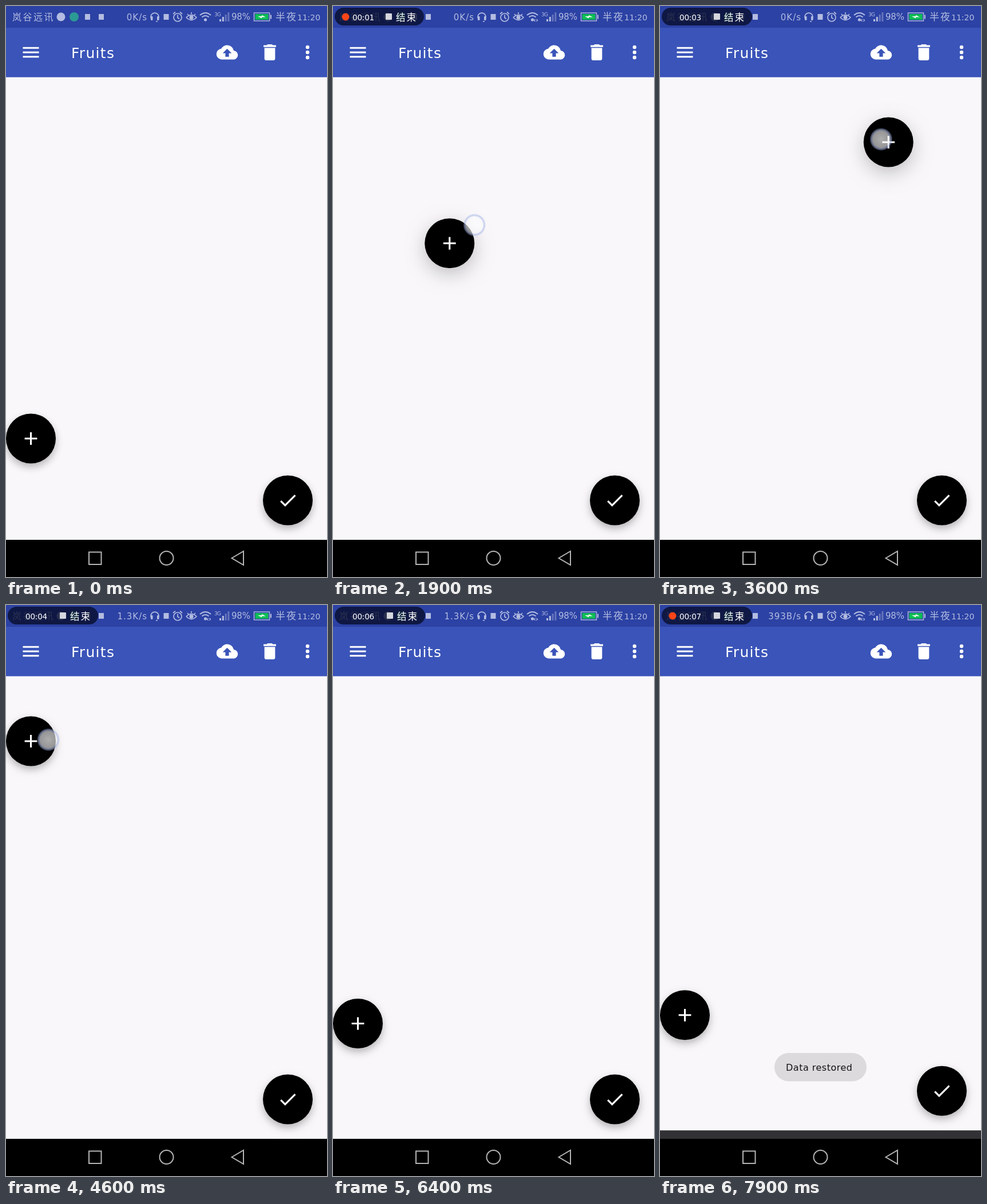
Animation of 561x998 px, one loop 8000 ms. Source, as an HTML page with a canvas:

```html
<!DOCTYPE html>
<html lang="en">
<head>
<meta charset="utf-8">
<title>Floating button</title>
<style>
html, body { margin: 0; width: 561px; height: 998px; overflow: hidden; background: #f9f7fa; }
canvas { display: block; }
</style>
</head>
<body>
<canvas id="stage" width="561" height="998"></canvas>
<script>
const c = document.getElementById('stage').getContext('2d');
const LOOP = 8000, DP = 1.558, PALE = '#b3bce1';
const LATIN = '"DejaVu Sans", sans-serif', HAN = '"Noto Sans CJK SC", "Noto Sans CJK", sans-serif';

const icons = {
  menu: 'M3 18h18v-2H3v2zm0-5h18v-2H3v2zm0-7v2h18V6H3z',
  cloud: 'M19.35 10.04C18.67 6.59 15.64 4 12 4 9.11 4 6.6 5.64 5.35 8.04 2.34 8.36 0 10.91 0 14c0 3.31 2.69 6 6 6h13c2.76 0 5-2.24 5-5 0-2.64-2.05-4.78-4.65-4.96zM14 13v4h-4v-4H7l5-5 5 5h-3z',
  bin: 'M6 19c0 1.1.9 2 2 2h8c1.1 0 2-.9 2-2V7H6v12zM19 4h-3.5l-1-1h-5l-1 1H5v2h14V4z',
  add: 'M19 13h-6v6h-2v-6H5v-2h6V5h2v6h6v2z',
  check: 'M9 16.17L4.83 12l-1.42 1.41L9 19 21 7l-1.41-1.41z'
};
for (const k in icons) icons[k] = new Path2D(icons[k]);

// time, x, y of the draggable button
const route = [
  [0, 43.5, 756], [300, 43.5, 756], [500, 60, 560], [700, 92, 330], [800, 96, 301],
  [1000, 120, 300], [1300, 150, 370], [1600, 170, 435], [1800, 185, 438],
  [1900, 203.5, 415], [2150, 265, 360], [2400, 340, 335], [2700, 414.5, 344.5],
  [2850, 440, 335], [3050, 517, 325], [3250, 517, 325], [3450, 475, 270],
  [3600, 400, 238], [3900, 180, 236], [4100, 90, 238], [4300, 43.5, 238],
  [4650, 43.5, 238], [5000, 110, 300], [5400, 160, 432], [5800, 130, 640],
  [6050, 80, 731.5], [6250, 43.5, 731.5]
];
// finger position relative to the button, one list per drag
const drags = [
  [[300, 0, -5], [800, -7, -14], [1900, 43.5, -32], [2700, 47.5, -27.5], [2850, 47, -27]],
  [[3250, -5, -5], [4150, -25, -5]],
  [[4550, 31, -3], [6050, 20, 8]]
];
// start, end, x, y
const taps = [[6550, 6720, 461, 81], [7400, 7550, 482, 895]];

const clamp = v => Math.max(0, Math.min(1, v));
const ease = (t, from, span) => { const u = clamp((t - from) / span); return u * u * (3 - 2 * u); };

function along(keys, t) {
  let i = 0;
  while (i < keys.length - 2 && t > keys[i + 1][0]) i++;
  const a = keys[i], b = keys[i + 1], u = clamp((t - a[0]) / (b[0] - a[0]));
  return [a[1] + (b[1] - a[1]) * u, a[2] + (b[2] - a[2]) * u];
}

function rect(x, y, w, h, fill, r = 0) {
  c.fillStyle = fill;
  c.beginPath();
  c.roundRect(x, y, w, h, r);
  c.fill();
}

function disc(x, y, r, fill) {
  c.fillStyle = fill;
  c.beginPath();
  c.arc(x, y, r, 0, 7);
  c.fill();
}

function line(d, color = PALE, width = 1.7) {
  c.strokeStyle = color;
  c.lineWidth = width;
  c.stroke(new Path2D(d));
}

function text(s, x, y, size, color, gap = 0, family = LATIN, align = 'left') {
  c.font = size + 'px ' + family;
  c.letterSpacing = gap + 'px';
  c.textAlign = align;
  c.fillStyle = color;
  c.fillText(s, x, y);
}

function icon(name, x, y) {
  c.save();
  c.translate(x, y);
  c.scale(DP, DP);
  c.translate(-12, -12);
  c.fillStyle = '#fff';
  c.fill(icons[name]);
  c.restore();
}

function fab(name, x, y, lifted) {
  c.save();
  c.shadowColor = lifted ? 'rgba(0,0,0,.23)' : 'rgba(0,0,0,.28)';
  c.shadowBlur = lifted ? 32 : 14;
  c.shadowOffsetY = lifted ? 10 : 6;
  disc(x, y, 43.5, '#000');
  c.restore();
  icon(name, x, y);
}

function statusBar(t) {
  rect(0, 0, 561, 38, '#2c42a4');
  text('岚谷远讯', 11, 25, 16, PALE, 2.5, HAN);
  disc(96, 19, 7.5, PALE);
  disc(119, 19, 8, '#2c9a94');
  rect(138, 14, 9, 10, PALE);
  rect(162, 14, 9, 10, PALE);

  const speed = t < 4000 ? '0K/s' : t < 7000 ? '1.3K/s' : '393B/s';
  text(speed, 247, 25, 15, PALE, 1, LATIN, 'right');
  // headset
  line('M255 24A7 7 0 1 1 265 24M262 27h3');
  rect(253, 18, 3.5, 7, PALE, 1);
  rect(264, 18, 3.5, 7, PALE, 1);
  rect(275.5, 14, 9, 10, PALE);
  // alarm
  line('M293 20a7 7 0 1 0 14 0a7 7 0 1 0 -14 0M300 15.500v5l3 2M292 14l4-3.500M308 14l-4-3.500');
  // eye
  line('M315 20q9-9 18 0q-9 9-18 0M317 14l2 2M324 11v3M331 14l-2 2');
  disc(324, 20, 3.5, PALE);
  // wifi
  line('M339 16q9.500-8 19 0M342.500 19.500q6-5 12 0', PALE, 2);
  disc(348.5, 24, 2.6, PALE);
  if (t > 1500) line('M353.500 23l-2 2 2 2M355.500 23l2 2-2 2', PALE, 1.2);
  text('3G', 364, 18, 9, PALE, -.8);
  for (let i = 0; i < 4; i++) {
    const h = 4 + i * 4;
    rect(373 + i * 4.8, 27 - h, 3, h, i < 2 ? PALE : '#6675bd');
  }
  text('98%', 394, 24, 15, PALE, -.2);
  // battery
  c.strokeStyle = PALE;
  c.lineWidth = 1.4;
  c.strokeRect(433.5, 12, 27, 14);
  rect(435.5, 14, 23, 10, '#0fbd55');
  rect(462, 15.5, 2, 7, PALE);
  c.fillStyle = '#fff';
  c.fill(new Path2D('M440 18l7 0 0-2 7 3.500-7 0 0 2z'));
  text('半夜', 471, 25, 17, PALE, 2, HAN);
  text('11:20', 509, 25, 14, PALE);
}

function recorder(t) {
  if (t < 200) return;
  const clock = t - 250, sec = Math.max(0, Math.floor(clock / 1000));
  const shift = sec === 1 ? -2 : 0;
  rect(3, 3, 158 + shift, 31, 'rgba(8,14,44,.8)', 15.5);
  if ((clock + 1000) % 1000 >= 500) disc(22, 19, 6.5, '#fb4518');
  text('00:0' + sec, 34, 25, 13.5, '#fff', -.2);
  rect(94 + shift, 13, 11, 11, '#d5d7de', 1);
  text('结束', 112 + shift, 25.5, 16.5, '#fff', 2, HAN);
}

function toolbar() {
  rect(0, 38, 561, 86.5, '#3a54b9');
  icon('menu', 43.5, 81);
  text('Fruits', 114, 91, 25, '#fff', 1.3);
  icon('cloud', 386.5, 81);
  icon('bin', 461, 81);
  for (const y of [72, 81, 90]) disc(527, y, 3.2, '#fff');
}

function navBar() {
  rect(0, 933, 561, 65, '#000');
  line('M145 954.500h21.500v21.500h-21.500z', '#b5b5b5', 2);
  line('M268.500 965a12 12 0 1 0 24 0a12 12 0 1 0 -24 0', '#b5b5b5', 2);
  line('M394.500 965l20.500-12v24z', '#b5b5b5', 2);
}

function finger(x, y) {
  const g = c.createRadialGradient(x, y, 0, x, y, 20);
  g.addColorStop(0, 'rgba(255,255,255,.68)');
  g.addColorStop(.72, 'rgba(250,250,252,.6)');
  g.addColorStop(.84, 'rgba(170,184,230,.62)');
  g.addColorStop(.92, 'rgba(165,180,230,.4)');
  g.addColorStop(1, 'rgba(165,180,230,0)');
  disc(x, y, 20, g);
}

function draw(t) {
  rect(0, 0, 561, 998, '#f9f7fa');
  toolbar();

  const rise = 75 * (ease(t, 6750, 250) - ease(t, 7722, 250));
  const [x, y] = along(route, t);
  const drag = drags.find(d => t >= d[0][0] && t < d[d.length - 1][0]);
  fab('check', 492.5, 864 - rise, false);
  fab('add', x, y - rise, !!drag && t > drag[0][0] + 100);

  if (rise > 0) {
    const top = 933 - rise;
    rect(0, top, 561, 75, '#323135');
    text('Data deleted', 37, top + 43, 16, '#fff', .4);
    text('UNDO', 509, top + 43, 16, '#ff4081', .4, LATIN, 'right');
  }
  navBar();

  c.globalAlpha = ease(t, 7600, 200);
  rect(200, 783, 161, 49.5, '#dcdadd', 24.7);
  text('Data restored', 220, 814, 16, '#111', .5);
  c.globalAlpha = 1;

  statusBar(t);
  recorder(t);
  if (drag) {
    const [dx, dy] = along(drag, t);
    finger(x + dx, y + dy);
  }
  for (const [from, to, px, py] of taps) if (t >= from && t < to) finger(px, py);
}

const start = performance.now();
function tick() {
  draw((performance.now() - start) % LOOP);
  requestAnimationFrame(tick);
}
tick();
</script>
</body>
</html>
```
